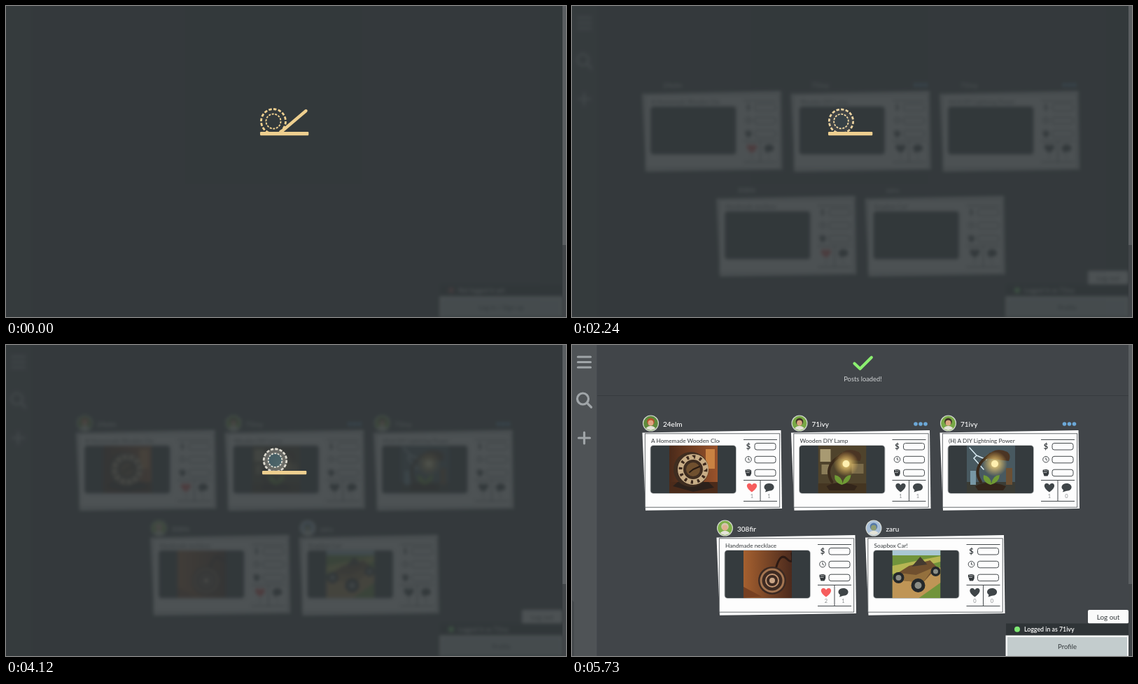
Recreate the animation shown at these times as an HTML page. Size 800 by 445 pixels, loop 5.97 s.

```html
<!DOCTYPE html>
<html lang="en">
<head>
<meta charset="utf-8">
<title>Loading posts</title>
<style>
html, body { margin: 0; width: 100%; height: 100%; overflow: hidden; background: #414549; }
svg { display: block; }
text { font-family: Lato, "Open Sans", sans-serif; }
.title { font-size: 8.3px; fill: #34393c; }
.name { font-size: 10px; font-weight: 500; fill: #fff; }
.count { font-size: 7.5px; fill: #8a8e90; text-anchor: middle; }
.mid { text-anchor: middle; }
.line { fill: none; stroke: #44494c; stroke-width: 1; }
.nav { fill: none; stroke: #a0a5a8; stroke-width: 3.2; stroke-linecap: round; }
.tan { fill: none; stroke: #eecf8f; }
</style>
</head>
<body>
<svg id="stage" width="800" height="445" viewBox="0 0 800 445"></svg>
<script>
const LOOP = 5970, CYCLE = 3000;
const stage = document.getElementById('stage');
const circle = (x, y, r, attrs) => `<circle cx="${x}" cy="${y}" r="${r}" ${attrs}/>`;
const rect = (x, y, w, h, attrs) => `<rect x="${x}" y="${y}" width="${w}" height="${h}" ${attrs}/>`;
const path = (d, attrs) => `<path d="${d}" ${attrs}/>`;
const text = (x, y, str, attrs) => `<text x="${x}" y="${y}" ${attrs}>${str}</text>`;
const fill = c => `fill="${c}"`;
const stroke = (c, w) => `fill="none" stroke="${c}" stroke-width="${w}" stroke-linecap="round"`;

const lamp = path('M20 52Q10 36 22 22L34 12', stroke('#3a2a1b', 4)) +
  path('M28 18Q38 0 58 9Q64 14 60 22Z', fill('#4b3524')) +
  circle(40, 26, 18, fill('url(#glow)')) + circle(40, 26, 5, fill('#fff0b0')) +
  path('M12 58Q30 48 56 58L52 64H16Z', fill('#33251a')) +
  path('M34 56Q22 52 24 42Q34 44 35 54Q38 42 47 42Q46 53 34 56Z', fill('#6f9a35'));
const wheel = (x, y, r) => circle(x, y, r, fill('#24282b')) + circle(x, y, r * .5, fill('#8b8d86'));

const photos = {
  clock: rect(0, 0, 69, 68, fill('url(#warm)')) + rect(0, 52, 69, 16, fill('#4b2b1a')) +
    rect(52, 5, 13, 28, fill('#c98242')) + path('M5 58L12 52H56L64 60L34 66Z', fill('#2c211b')) +
    circle(31, 34, 25, fill('#3f2d20')) + circle(34, 34, 18, stroke('#c8ad86', 8)) +
    circle(34, 34, 18, 'fill="none" stroke="#3c291d" stroke-width="5" pathLength="12" stroke-dasharray=".35 .65"') +
    circle(34, 34, 10, fill('#70502f')) + path('M34 34L43 30M34 34L29 38', stroke('#271a12', 2)),
  lamp: rect(0, 0, 69, 68, fill('#4f432c')) + rect(3, 5, 15, 18, fill('#a89a72')) +
    rect(5, 27, 11, 14, fill('#8a7c58')) + rect(48, 26, 17, 14, fill('#796a49')) +
    rect(0, 54, 69, 14, fill('#443521')) + lamp,
  storm: rect(0, 0, 69, 68, fill('#485960')) + rect(0, 52, 69, 16, fill('#3b3c35')) +
    path('M4 3L14 14L10 18L24 34M14 14L28 20', stroke('#d8eaf2', 1.5)) +
    rect(5, 36, 8, 20, fill('#7897a4')) + rect(56, 32, 9, 24, fill('#6b5034')) + lamp,
  pendant: rect(0, 0, 69, 68, fill('url(#copper)')) + path('M46 27Q52 2 62 12T69 4', stroke('#2c1a14', 3)) +
    path('M0 52L26 66L0 68Z', fill('#764022')) + circle(41, 43, 20, fill('#3d2a22')) +
    circle(41, 43, 16, stroke('#a47551', 3)) + circle(41, 43, 9, stroke('#c39572', 2)) +
    circle(41, 43, 4, fill('#caa688')),
  car: rect(0, 0, 69, 68, fill('#71943c')) + rect(0, 0, 69, 7, fill('#a9c7d3')) +
    path('M0 22L69 8V16L0 34Z', fill('#b7b653')) + path('M0 42L69 24V46L38 68H0Z', fill('#bf9556')) +
    path('M5 34L24 22L54 14L64 24L44 46L14 43Z', fill('#70502f')) +
    path('M28 23L40 9L50 20Z', fill('#443a30')) + path('M8 32L34 35L60 24L44 46L14 43Z', fill('#94703d')) +
    wheel(9, 39, 8) + wheel(37, 50, 10) + wheel(62, 30, 7)
};

const heart = c => path('M257 210.5C246 203 250 197 254 198Q256 198.400 257 200.500Q258 198.400 260 198C264 197 268 203 257 210.500Z', fill(c));
const icons = text(252, 149, '$', 'class="mid" font-size="11" font-weight="700" fill="#34393c"') +
  circle(252, 163.7, 4.3, 'class="line"') + path('M252 161V164L254 165', 'class="line"') +
  path('M247.500 181.500V179.500Q248.500 177.500 249.700 179Q250.500 176.700 251.800 178.500Q253 176.700 254 178.800Q256 178 256.200 180.500V184L254.500 187.500H249.500Z', fill('#34393c')) +
  path('M248.500 182.500H253.500M250 179V181M252 179V181M254 179.500V181', 'stroke="#fff" stroke-width=".6"');

function avatar(outer, skin, hair) {
  return circle(112.5, 112, 11.5, fill('#d9ddd6')) + circle(112.5, 112, 10.4, fill(outer)) +
    circle(112.5, 109.8, 5.3, fill(hair)) + circle(112.5, 111.5, 3.9, fill(skin)) +
    path('M105.500 119Q112.500 112.500 119.500 119Q112.500 125 105.500 119Z', fill('#e4e3d8'));
}

function card(dx, dy, c) {
  return `<g transform="translate(${dx} ${dy})">` +
    path('M100.500 125.500L298.500 122L300 234L105 236.800Z', fill('#fff')) +
    rect(104.3, 126.8, 192.4, 105.4, 'fill="#fdfdfd" stroke="#54595c" stroke-width=".9"') +
    `<svg x="113" y="128" width="98" height="15">${text(0, 12, c.title, 'class="title"')}</svg>` +
    rect(111.5, 143.2, 123.5, 69.8, 'rx="5" fill="#b9bcbd"') + rect(112.5, 144, 121.5, 68, 'rx="4" fill="#353b3e"') +
    path('M245 135.500H293M245 193.500H293M245 223.500H293M269 193.500V223', 'class="line"') + icons +
    [140.5, 159.3, 178.2].map(y => rect(261, y, 30, 9.5, 'rx="3" class="line"')).join('') +
    heart(c.liked ? '#f65d5d' : '#3f4548') +
    path('M281.500 198C291 198 291 209 281.500 208.700L276 210.500L277 207.500C272 204 275 198 281.500 198Z', fill('#3f4548')) +
    text(257, 219, c.likes, 'class="count"') + text(281.5, 219, c.notes, 'class="count"') +
    text(130, 116.5, c.user, 'class="name"') +
    (c.menu ? [278.5, 285.5, 292.5].map(x => circle(x, 113, 2.8, fill('#6ca8d8'))).join('') : '') +
    `<g class="late">${avatar(...c.face)}<svg x="139" y="144" width="69" height="68">${photos[c.photo]}</svg></g></g>`;
}

const green = ['#78a845', '#d9a680', '#3f3026'];
const cards = [
  { title: 'A Homemade Wooden Clock', user: '24elm', photo: 'clock', likes: 1, notes: 1, liked: true, face: ['#5f8a3c', '#e0a583', '#b5502a'] },
  { title: 'Wooden DIY Lamp', user: '71ivy', photo: 'lamp', likes: 1, notes: 1, menu: true, face: green },
  { title: '(H) A DIY Lightning Power', user: '71ivy', photo: 'storm', likes: 1, notes: 0, menu: true, face: green },
  { title: 'Handmade necklace', user: '308fir', photo: 'pendant', likes: 2, notes: 1, liked: true, face: ['#7fb04a', '#dfb08e', '#d3c6ae'] },
  { title: 'Soapbox Car!', user: 'zaru', photo: 'car', likes: 0, notes: 0, face: ['#a9bfd8', '#8f9d73', '#5579a8'] }
];
const place = i => i < 3 ? [i * 212.5, 0] : [106 + (i - 3) * 212.5, 150];

const gradient = (id, a, b) => `<linearGradient id="${id}"><stop stop-color="${a}"/><stop offset="1" stop-color="${b}"/></linearGradient>`;

stage.innerHTML = `<defs>${gradient('warm', '#4a2a1a', '#9a532b')}${gradient('copper', '#a5602f', '#4b2a1d')}
  <radialGradient id="glow"><stop stop-color="#ffe28a"/><stop offset="1" stop-color="#ffc95a" stop-opacity="0"/></radialGradient></defs>
<g id="page">
  ${rect(-20, -20, 840, 485, fill('#414549'))}
  ${rect(-20, -20, 55.5, 485, fill('#4f5356'))}
  ${path('M0 365L3 368V445H0Z', fill('#44484b'))}
  <g id="nav">${path('M8.500 17H26.500M8.500 24.500H26.500M8.500 32H26.500', 'class="nav"')}
    ${circle(15.5, 77, 8, 'class="nav"')}${path('M21.500 83L27.500 89', 'class="nav"')}
    ${path('M17.500 125V141M9.500 133H25.500', 'class="nav"')}</g>
  <g id="cards">${cards.map((c, i) => card(...place(i), c)).join('')}</g>
  <g id="panel">${rect(36, -1, 759, 73, fill('#414549'))}${rect(36, 72, 759, 1, fill('#373b3e'))}</g>
  ${path('M403.500 26.500L411.500 34L427.800 17.800', 'id="check" fill="none" stroke="#8bef70" stroke-width="4.2" stroke-linecap="round" stroke-linejoin="round" pathLength="1" stroke-dasharray="1 2"')}
  ${text(415.5, 52, 'Posts loaded!', 'id="done" class="mid" font-size="9.3" font-weight="500" fill="#c6c9cb"')}
  <g id="logout">${rect(737, 379, 58, 19.5, 'rx="2" fill="#fafafa"')}${text(766, 392.5, 'Log out', 'class="mid" font-size="9.9" fill="#34393c"')}</g>
  ${rect(620, 398.5, 175, 17, fill('#2f3437'))}
  ${circle(636, 406.7, 4, 'id="dot"')}
  ${text(646, 410, '', 'id="status" font-size="8.8" font-weight="600" fill="#fff"')}
  ${rect(619.5, 415.5, 176, 30, fill('#f4f6f6'))}${rect(622, 418, 171, 27, fill('#c3cccd'))}
  ${text(707.5, 435, '', 'id="profile" class="mid" font-size="9.5" fill="#34393c"')}
</g>
<g id="overlay">
  ${rect(0, 0, 795, 445, 'fill="#32383a" fill-opacity=".865"')}
  <g id="blade">
    ${circle(0, 0, 20, 'id="halo" fill="none" stroke="#c9c0b4" stroke-width="3"')}
    <g id="disc">${circle(0, 0, 17, fill('#85857f'))}${circle(0, 0, 10.5, fill('#4f7480'))}</g>
    <g id="teeth">${circle(0, 0, 17.5, 'id="outer" class="tan" stroke-width="2.8" pathLength="16" stroke-dasharray=".65 .35"')}
      ${circle(0, 0, 10.5, 'id="inner" class="tan" stroke-width="1.9" pathLength="14" stroke-dasharray=".65 .35"')}</g>
  </g>
  ${path('', 'id="arm" class="tan" stroke-width="4.4" stroke-linecap="round"')}
  <rect id="base" y="180" height="5.3" rx="1.2" fill="#eecf8f"/>
  ${text(397.5, 199, 'Loading...', 'id="loading" class="mid" font-size="9.4" fill="#a5aaac"')}
</g>
${rect(795, 0, 5, 445, fill('#414548'))}${rect(795, 0, 5, 342, fill('#5a5e61'))}`;

const $ = Object.fromEntries([...stage.querySelectorAll('[id]')].map(e => [e.id, e]));
const late = stage.querySelectorAll('.late');
const ramp = (t, a, b) => Math.min(1, Math.max(0, (t - a) / (b - a)));
const pulse = (t, a, b, c, d) => ramp(t, a, b) * (1 - ramp(t, c, d));
const easeOut = p => 1 - (1 - p) ** 3;
const set = (e, attrs) => { for (const k in attrs) e.setAttribute(k, attrs[k]); };
const mix = (a, b, p) => `rgb(${a.map((v, i) => Math.round(v + (b[i] - v) * p))})`;
const TAN = [238, 207, 143], PALE = [222, 219, 208];

function drawLoader(t) {
  const p = t % CYCLE;
  const wide = 1 - easeOut(ramp(t, 0, 250));
  const full = pulse(p, 650, 1400, 1700, 2350);
  const lift = p < 1500 ? 1 - ramp(p, 0, 580) : ramp(p, 2400, CYCLE);
  const tint = mix(TAN, PALE, pulse(p, 550, 900, 1800, 2400));
  set($.blade, { transform: `translate(${384.5 - 2.5 * wide} 165)` });
  set($.teeth, { transform: `rotate(${t * .12})` });
  set($.halo, { opacity: .5 * pulse(p, 350, 600, 620, 1100) });
  set($.disc, { opacity: full });
  set($.outer, { r: 17.5 - 2 * full, style: `stroke:${tint}` });
  set($.inner, { r: 10.5 - full, style: `stroke:${tint}` });
  set($.arm, { d: `M392 181L${427.5 + wide} ${182 - 32 * lift}`, opacity: lift > 0 ? 1 : 0 });
  set($.base, { x: 366 - 3 * wide, width: 63.3 + 6 * wide });
  set($.loading, { opacity: .65 * pulse(p, 1300, 1550, 1800, 2200) });
}

function draw(now) {
  const t = now % LOOP;
  const veil = 1 - ramp(t, 4270, 4430);
  const logged = t >= 1300;
  drawLoader(t);
  $.page.style.filter = veil ? `blur(${2.6 * veil}px)` : 'none';
  set($.overlay, { opacity: veil });
  set($.nav, { opacity: ramp(t, 0, 150) });
  set($.logout, { opacity: ramp(t, 1300, 1480) });
  set($.dot, { fill: logged ? '#7ee873' : '#a85555' });
  $.status.textContent = logged ? 'Logged in as 71ivy' : 'Not logged in yet';
  $.profile.textContent = logged ? 'Profile' : 'Log in / Sign up';
  set($.cards, { opacity: ramp(t, 1900, 2250) });
  late.forEach(e => set(e, { opacity: ramp(t, 2480, 2750) }));
  set($.panel, { transform: `translate(0 ${-74 * (1 - easeOut(ramp(t, 4480, 4840)))})` });
  const tick = easeOut(ramp(t, 4870, 5250));
  set($.check, { 'stroke-dashoffset': 1 - tick, opacity: tick > 0 ? 1 : 0 });
  set($.done, { opacity: tick });
}

let start;
function loop(now) {
  start ??= now;
  draw(now - start);
  requestAnimationFrame(loop);
}
draw(0);
requestAnimationFrame(loop);
</script>
</body>
</html>
```
